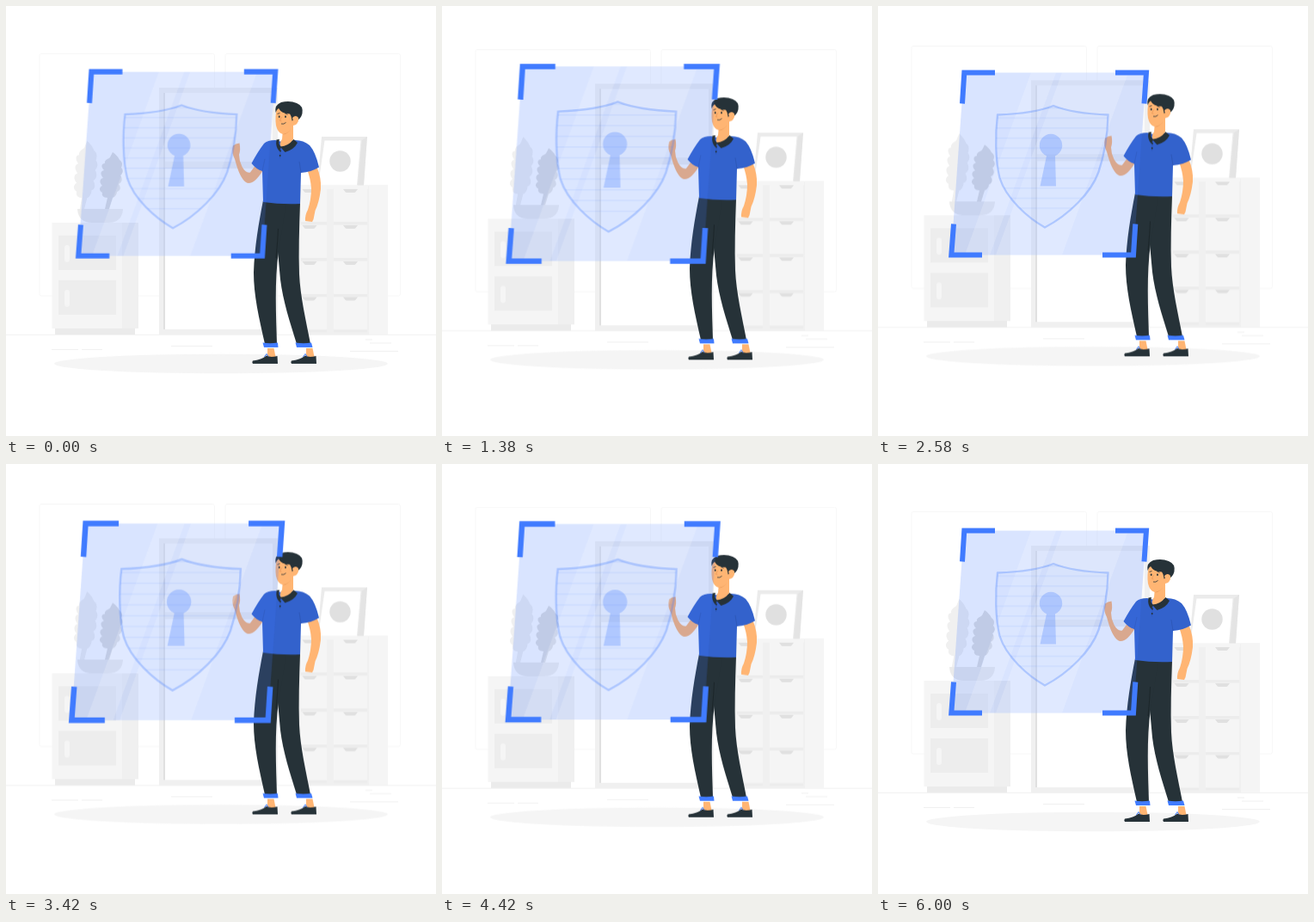
Recreate the animation shown at these times as an HTML page without scripts. Size 500 px wide and 500 px high, loop 6040 ms.

```html
<!DOCTYPE html>
<html lang="en">
<head>
<meta charset="utf-8">
<title>Data shield</title>
<style>
  html, body { margin: 0; width: 100%; height: 100%; overflow: hidden; background: #fff; }
  svg { display: block; width: 100vw; height: 100vh; }

  .scene { animation: float 6.04s linear -.03s infinite; }
  .screen { transform-origin: 199px 183.5px; animation: beat 3.02s linear -.03s infinite; }

  @keyframes float {
    0%, 100% { transform: translateY(0); }
    50% { transform: translateY(-10px); }
  }
  @keyframes beat {
    0%, 30%, 40%, 60%, 100% { transform: scale(1); }
    10%, 50% { transform: scale(1.1); }
  }

  .g1 { fill: #fafafa; }
  .g2 { fill: #f5f5f5; }
  .g3 { fill: #f0f0f0; }
  .g4 { fill: #ebebeb; }
  .g5 { fill: #e0e0e0; }
  .blue { fill: #407bff; }
  .ink { fill: #263238; }
  .skin { fill: #ffb573; }
  .shirt { fill: #3362cc; }
  .line { fill: none; stroke: #f5f5f5; }
</style>
</head>
<body>
<svg viewBox="0 0 500 500">
  <defs>
    <clipPath id="inside">
      <path id="shield" d="M204 116Q181 125 139 126.500C136 150 136.500 180 141.500 200C149 224 174 246 194 257.500C222 243 248 217 256.500 193C263.500 172 267 150 267.500 126.500Q227 125 204 116Z"/>
    </clipPath>
    <pattern id="stripes" y="129.500" width="10" height="11.650" patternUnits="userSpaceOnUse">
      <path d="M0 .8H10" stroke="#407bff" stroke-width="1.300"/>
    </pattern>
    <path id="grip" d="M0 0H17L14.500 3.200Q14 4 13 4H4Q3 4 2.500 3.200Z"/>
    <g id="row">
      <path class="g2" d="M343 0H373V38H343ZM381 0H420V38H381Z"/>
      <path class="g4" d="M343 38H373V41H343ZM381 38H420V41H381Z" opacity=".7"/>
      <use href="#grip" class="g5" x="344.500"/>
      <use href="#grip" class="g5" x="392"/>
    </g>
    <g id="door">
      <rect class="g4" width="67" height="40" opacity=".8"/>
      <rect class="g2" x="7" y="11" width="6" height="20" rx="3"/>
    </g>
    <path id="leaf" d="M16 0C20 3 22 5 24 9C27 11 28 14 26 18C29 21 28 25 25 27C28 31 27 35 23 37C26 41 25 45 21 46C21 49 19 52 16 53L12 66H7L10 53C5 53 3 50 4 47C0 45 0 41 4 39C0 35 1 31 5 30C1 25 2 22 6 21C2 17 3 13 7 13C6 9 11 8 13 6Z"/>
    <g id="shoe">
      <path class="skin" d="M18 0H25.500L27.500 10H18Z"/>
      <path class="ink" d="M17 8.500Q21 11 29.500 9L30 18H1Q-.5 16 1 14.500Q11 13.500 17 8.500Z"/>
      <path d="M14.500 10L17 6.500L19 9.500" fill="none" stroke="#407bff"/>
    </g>
  </defs>

  <g class="scene">
    <!-- room -->
    <g class="line" stroke-width=".8">
      <rect x="39" y="55.500" width="203.500" height="281.500" rx="2"/>
      <rect x="255" y="55.500" width="203.500" height="281.500" rx="2"/>
      <path d="M0 382.300H500M53 399.500H84M88 399.500H112M192 395.500H240M423 392H448M418 388H426M400 401.500H456" stroke="#ededed"/>
    </g>
    <ellipse class="g2" cx="250" cy="416" rx="194" ry="11.300"/>

    <!-- doorway -->
    <path class="g3" d="M178 95H316V382H178Z"/>
    <path fill="#fff" d="M184 101H310V376H184Z"/>
    <path class="g5" d="M183 101H185V376H183Z"/>
    <path class="g3" d="M185 181H310V189H185Z"/>
    <path class="g1" d="M185 101H310V181H185Z"/>

    <!-- cupboard and plant -->
    <use href="#leaf" class="g3" transform="translate(78 157) scale(1.02 1.25)"/>
    <use href="#leaf" class="g5" x="108" y="170"/>
    <path class="g4" d="M83 236H136Q135 252 119 252H100Q84 252 83 236Z"/>
    <path class="g4" d="M57 374H150V382H57Z"/>
    <path class="g2" d="M53.500 252H135V375H53.500Z"/>
    <path class="g3" d="M135 252H154V375H135Z"/>
    <use href="#door" x="61" y="267"/>
    <use href="#door" x="61" y="319"/>

    <!-- drawers -->
    <path class="g3" d="M340 208.500H444V382H340Z"/>
    <path class="g2" d="M340 208.500H421V213H340ZM422 208.500H444V382H422Z"/>
    <use href="#row" y="213"/>
    <use href="#row" y="255"/>
    <use href="#row" y="297"/>
    <use href="#row" y="338.500"/>

    <!-- picture -->
    <path class="g4" d="M367 152H420L416 208.500H362Z"/>
    <path class="g5" d="M420 152L416 208.500H409L414 156Z" opacity=".6"/>
    <path fill="#fff" d="M370.500 156.500H412.500L408 208.500H363Z"/>
    <circle class="g5" cx="388.500" cy="180.500" r="12.200"/>

    <!-- legs -->
    <use href="#shoe" x="286" y="398"/>
    <use href="#shoe" x="331" y="398"/>
    <path class="ink" d="M313 229L342 229C341 258 340 286 341 312C342 337 349 367 354 393H338C330 367 322 343 319 318L316 285Z"/>
    <path class="ink" d="M299 226L326 229L317 285C312 320 314 360 315 393H301C294 362 288 336 288 310C289 280 294 252 299 226Z"/>
    <path d="M316.500 259Q316 274 314 293" fill="none" stroke="#1b2529" stroke-width=".9"/>
    <path class="blue" d="M298.500 391.500Q307 393 316 391.500L316.500 397H300ZM336.500 391.500Q346 393 355 391.500L356.500 397H338Z"/>

    <!-- arms -->
    <path class="skin" d="M264 162.500Q267 160 271.500 159.500Q273 167 271 173Q271 180 274.500 187Q279 195 284 193.500L291 184L299 191C293 200 288 206 282 206C274 205 269 189 266 178Q262 171 264 162.500Z"/>
    <path class="skin" d="M350 190L361 186Q367 200 366 213Q364 229 359.500 238L357.500 248L356 251L348 250Q347.500 243 351 237Q355 225 355 212Q354 200 350 190Z"/>

    <!-- shirt -->
    <path class="shirt" d="M313 156Q304 156 300 160Q293 169 285.500 183Q291 190 298 192L299 228Q320 231 342 230L343 194Q355 193 364 187.500Q360 170 353 162Q346 156 336 156Q325 160 313 156Z"/>
    <path d="M298 192L301 178M343 194L341 181" fill="none" stroke="#2c56b4" stroke-width=".8"/>

    <!-- head -->
    <path class="skin" d="M322 143L334 137L334 155Q329 165 320 164Q317 160 321 155Z"/>
    <path d="M322.500 149Q328 148 331 142" fill="none" stroke="#e99a5b" stroke-width="1.200"/>
    <path class="skin" d="M315 118Q312.500 130 314 139Q316 148 322 149Q330 148 334 139Q340 138 340 131Q338 126 333 128L332 117Z"/>
    <path class="ink" d="M313.500 124Q312 115 320 112Q330 109.500 338 113Q346 116 344.500 125Q343 131 338.500 133Q336 131 334 133L332.500 133.500Q332 128 330 125.500Q320 125 317 119Q315 120 313.500 124Z"/>
    <path class="skin" d="M333 130Q337 126 340 130Q341 136 335 137.500Z"/>
    <ellipse class="ink" cx="317.700" cy="128.700" rx=".9" ry="1.300"/>
    <ellipse class="ink" cx="325" cy="128.700" rx=".9" ry="1.300"/>
    <path d="M315.500 125.500L318.500 124.500M324 124.500L327.500 126.300M320 137Q323 138 325.500 135.500" fill="none" stroke="#263238" stroke-width=".8"/>
    <path d="M320.500 129L318.500 133.500L320.500 134" fill="none" stroke="#e99a5b" stroke-width=".8"/>
    <path class="ink" d="M314.500 155.500L318 155Q316 160 319.500 163.500Q328 163 334.500 155L339 159Q335 167 324.500 170L320 165L318 169Q313 164 314.500 155.500Z"/>
    <path d="M319.500 165L318.500 177" stroke="#2c56b4" stroke-width=".8"/>
    <circle class="ink" cx="319" cy="168.500" r="1"/>
    <circle class="ink" cx="318.700" cy="174" r="1"/>
  </g>

  <g class="screen">
    <path class="blue" d="M100 77.500H312L297 289.500H85Z" opacity=".2"/>
    <path d="M178 77.500H207L130 289.500H101ZM214 77.500H291L214 289.500H137Z" fill="#fff" opacity=".2"/>
    <rect x="135" y="115" width="134" height="130" clip-path="url(#inside)" fill="url(#stripes)" opacity=".1"/>
    <use href="#shield" fill="#407bff" fill-opacity=".03" stroke="#407bff" stroke-opacity=".3" stroke-width="2.300"/>
    <path class="blue" d="M196 174.200A13.200 13.200 0 1 1 206 174.200L207 209.500H188.500Z" opacity=".28"/>
    <path d="M98 113.500L100.300 77.500H136M276 77.500H312L309.500 113.500M88 253.500L85.300 289.500H121M261 289.500H297L299.300 253.500" fill="none" stroke="#407bff" stroke-width="6"/>
  </g>
</svg>
</body>
</html>
```
